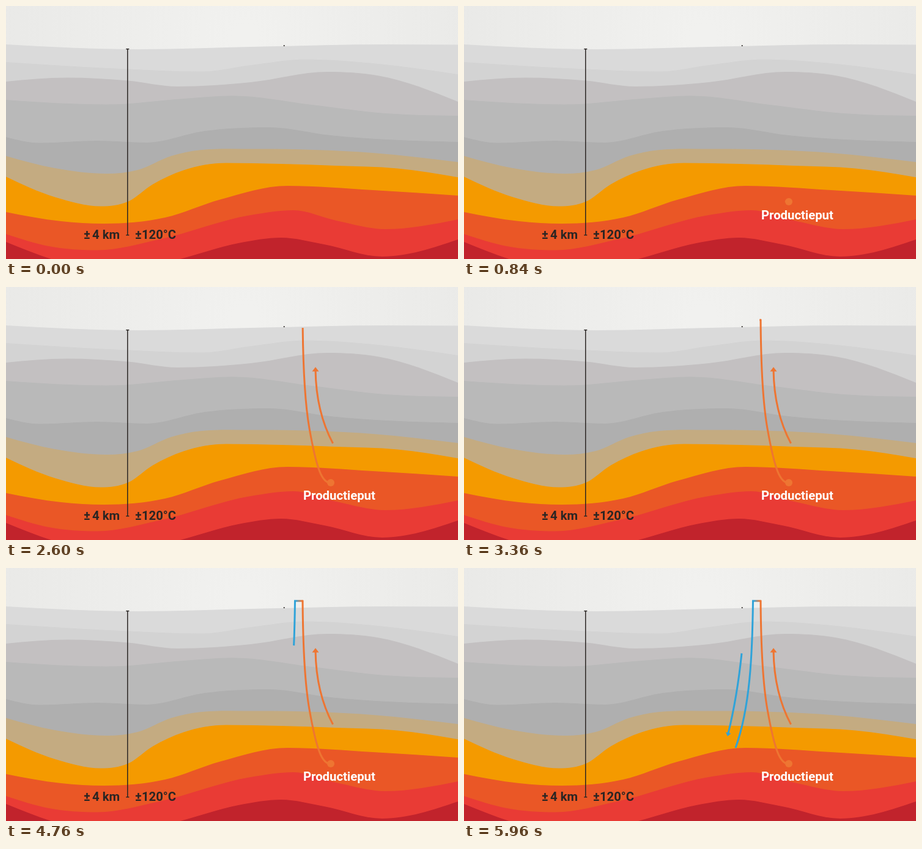
Animation of 739 by 415 pixels, one loop 6000 ms. Source, as an HTML page with a canvas:

```html
<!DOCTYPE html>
<html lang="nl">
<head>
<meta charset="utf-8">
<title>Productieput</title>
<style>
html, body { margin: 0; width: 100%; height: 100%; overflow: hidden; background: #eeeeec; }
canvas { display: block; }
</style>
</head>
<body>
<canvas id="stage"></canvas>
<script>
const W = 739, H = 415, LOOP = 6000, STEP = 40;
const ORANGE = '#ee7532', BLUE = '#2fa3d9', INK = '#2a2523';
const canvas = document.getElementById('stage');
const ctx = canvas.getContext('2d');
const dpr = window.devicePixelRatio || 1;
canvas.width = W * dpr;
canvas.height = H * dpr;
canvas.style.width = W + 'px';
canvas.style.height = H + 'px';
ctx.scale(dpr, dpr);

const span = (t, a, b) => Math.max(0, Math.min(1, (t - a) / (b - a)));
const easeOut = u => 1 - (1 - u) * (1 - u);

// Slopes for a smooth curve: flat at crests and troughs, blended elsewhere
function slopes(pts) {
  const last = pts.length - 1;
  const chord = i => (pts[i + 1][1] - pts[i][1]) / (pts[i + 1][0] - pts[i][0]);
  const m = pts.map((p, i) => {
    if (i === 0 || i === last) return 0;
    const a = chord(i - 1), b = chord(i);
    if (a * b <= 0) return 0;
    const left = p[0] - pts[i - 1][0], right = pts[i + 1][0] - p[0];
    return (a * right + b * left) / (left + right);
  });
  m[0] = 1.5 * chord(0) - 0.5 * m[1];
  m[last] = 1.5 * chord(last - 1) - 0.5 * m[last - 1];
  return m;
}

// Fill everything below the curve through a few key points
function layer(color, ...pts) {
  const m = slopes(pts);
  ctx.beginPath();
  ctx.moveTo(...pts[0]);
  for (let i = 1; i < pts.length; i++) {
    const [x0, y0] = pts[i - 1], [x1, y1] = pts[i];
    const d = (x1 - x0) / 3;
    ctx.bezierCurveTo(x0 + d, y0 + d * m[i - 1], x1 - d, y1 - d * m[i], x1, y1);
  }
  ctx.lineTo(W, H + 40);
  ctx.lineTo(0, H + 40);
  ctx.fillStyle = color;
  ctx.fill();
}

function ground() {
  const sky = ctx.createRadialGradient(390, 50, 20, 390, 50, 420);
  sky.addColorStop(0, '#f1f1ef');
  sky.addColorStop(1, '#e9e9e7');
  ctx.fillStyle = sky;
  ctx.fillRect(0, 0, W, H);
  layer('#dadada', [0, 63], [215, 71], [420, 66.5], [620, 63], [W, 63.5]);
  layer('#d3d3d3', [0, 92], [190, 103], [320, 107.5], [400, 97], [490, 87.5], [610, 95], [W, 112]);
  layer('#c3c0c1', [0, 124], [100, 117.5], [200, 122.5], [280, 132], [400, 125], [525, 108], [610, 114.5], [W, 157]);
  layer('#b9b9b9', [0, 154], [165, 161.5], [290, 152], [370, 147.3], [500, 162], [620, 176], [W, 180]);
  layer('#afafaf', [0, 215], [55, 224.5], [150, 221], [230, 224], [325, 205], [430, 199], [530, 212], [W, 223]);
  layer('#c4ab81', [0, 246], [80, 266], [165, 275], [215, 269], [270, 246], [410, 234.5], [600, 241], [W, 256]);
  layer('#f49a00', [0, 280], [80, 313.5], [155, 328.5], [200, 320.5], [240, 292.5], [290, 269.5], [360, 257.5],
    [540, 262], [640, 266.5], [W, 281]);
  layer('#ea5726', [0, 338], [90, 353], [160, 357], [260, 347], [350, 317.5], [460, 295], [600, 302], [W, 311]);
  layer('#e93b35', [0, 374], [70, 394], [150, 400.5], [250, 383], [400, 343], [470, 335], [540, 352], [620, 366], [W, 350]);
  layer('#c1232c', [0, 387], [80, 417], [180, 440], [285, 415], [380, 389], [450, 380], [520, 391], [615, 411], [W, 383]);
}

function label(text, x, y, color) {
  ctx.font = '700 20.3px Roboto, Arial, sans-serif';
  ctx.fillStyle = color;
  ctx.fillText(text, x, y);
}

function depthScale() {
  ctx.fillStyle = INK;
  ctx.fillRect(198, 70, 1.5, 306);
  ctx.fillRect(196.3, 69.8, 5, 1.5);
  ctx.fillRect(196.3, 375, 5, 1.5);
  ctx.fillRect(453.8, 64.2, 1.8, 1.8);
  label('±', 127, 381.5, INK);
  label('4 km', 141, 381.5, INK);
  label('±120°C', 211, 381.5, INK);
}

// Stroke only the first len pixels of a path
function trace(path, len, color) {
  if (len <= 0) return;
  ctx.setLineDash([len, 2000]);
  ctx.lineWidth = 3;
  ctx.strokeStyle = color;
  ctx.stroke(path);
}

function head(x, y, angle, size, color) {
  if (size <= 0) return;
  ctx.save();
  ctx.translate(x, y);
  ctx.rotate(angle);
  ctx.scale(size, size);
  ctx.beginPath();
  ctx.moveTo(0, -5);
  ctx.lineTo(5.5, 2.2);
  ctx.lineTo(-5.5, 2.2);
  ctx.fillStyle = color;
  ctx.fill();
  ctx.restore();
}

const hotWell = new Path2D('M531 321C517 322 508 300 496 232C489 192 485.5 130 485 53');
const bridge = new Path2D('M486 54H471');
const coldWell = new Path2D('M472.5 53C471.5 140 468 228 444 295');
const hotFlow = new Path2D('M534.5 256.5Q507 205 506 136');
const coldFlow = new Path2D('M454 140Q446.5 212 432 271');
const fade = ctx.createLinearGradient(485, 0, 472, 0);
fade.addColorStop(0.1, ORANGE);
fade.addColorStop(0.9, BLUE);

function draw(t) {
  ground();
  depthScale();

  // The well rises to the surface, then creeps up to the bridge
  const rise = 266 * span(t, 780, 2600) ** 1.1 + 18 * span(t, 2600, 3200);
  trace(hotWell, rise, ORANGE);
  trace(bridge, 15 * span(t, 3200, 4080), fade);
  trace(coldWell, 245 * span(t, 4240, 5960), BLUE);

  trace(hotFlow, 126 * span(t, 1700, 2440), ORANGE);
  head(506, 136.2, 0, span(t, 2360, 2560), ORANGE);
  trace(coldFlow, 134 * span(t, 5270, 5960), BLUE);
  head(431.8, 272, Math.PI + 0.25, 0.8 * span(t, 5820, 5960), BLUE);

  ctx.beginPath();
  ctx.arc(531, 321, 6 * easeOut(span(t, 480, 760)), 0, 2 * Math.PI);
  ctx.fillStyle = ORANGE;
  ctx.fill();

  ctx.globalAlpha = span(t, 440, 680);
  label('Productieput', 486, 349 + 14 * (1 - easeOut(span(t, 440, 1000))), '#fff');
  ctx.globalAlpha = 1;
}

const start = performance.now();
function tick() {
  const t = (performance.now() - start) % LOOP;
  draw(Math.floor(t / STEP) * STEP);
  requestAnimationFrame(tick);
}
tick();
</script>
</body>
</html>
```
